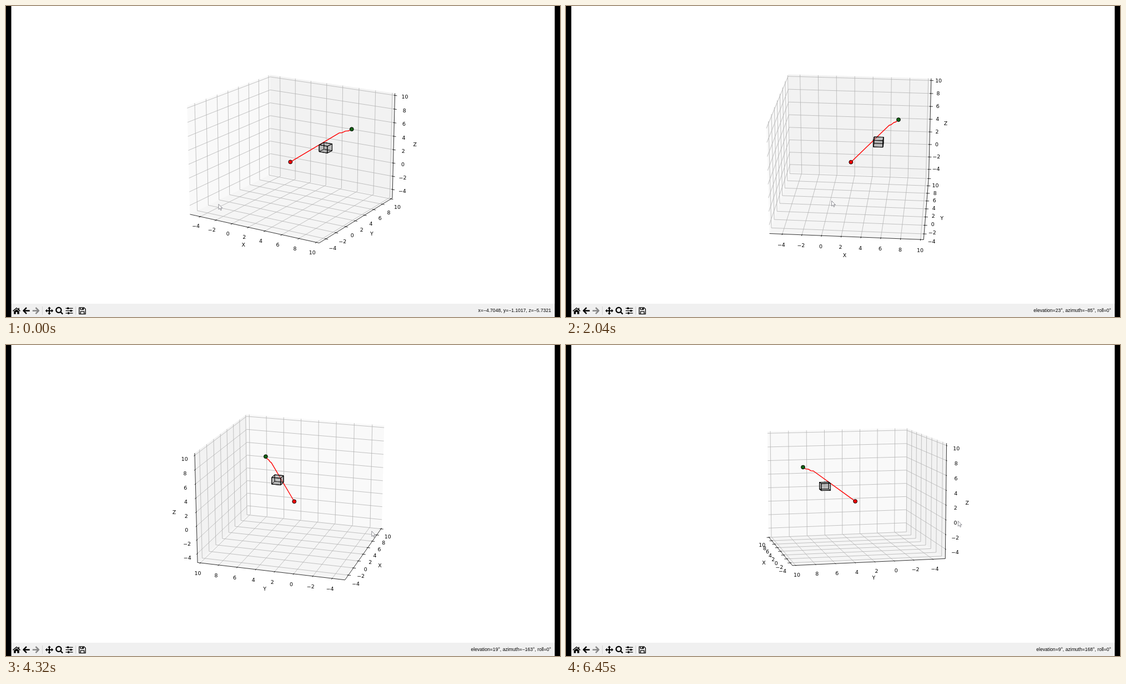
Write an HTML page with a canvas that moves like this. It is 998 px wide and 561 px high and loops after 6.54 s.

```html
<!DOCTYPE html>
<html lang="en">
<head>
<meta charset="utf-8">
<title>3D path plot</title>
<style>
html, body { margin: 0; width: 100%; height: 100%; overflow: hidden; background: #fff; }
canvas { display: block; }
</style>
</head>
<body>
<canvas id="stage" width="998" height="561"></canvas>
<script>
const ctx = document.getElementById('stage').getContext('2d');
const LOOP = 6540, DRAG_START = 1000;
const LO = -5.3125, HI = 10.3125, MID = 2.5;
const CENTER_X = 517, CENTER_Y = 266, SCALE = 2255;
const PLOT_FONT = '9.4px "DejaVu Sans", sans-serif';
const STATUS_FONT = '8.6px "Liberation Sans", Arial, sans-serif';

// time, azimuth, elevation, cursor x, cursor y
const KEYS = [
  [0, -58.4, 17.3, 383, 357.5],
  [600, -58.4, 17.3, 422.5, 350.5],
  [DRAG_START, -58.4, 17.3, 423.5, 350],
  [1410, -64, 18.7, 433.5, 347],
  [2040, -84.9, 22.6, 478.5, 351.5],
  [2910, -116, 23.5, 552, 352],
  [3720, -144.3, 22.6, 606.5, 349],
  [4830, -177, 13.7, 692.5, 323.5],
  [5460, -192.4, 8.6, 706.3, 317.5],
  [LOOP, -192.4, 8.6, 706.3, 317.5]
];
const PATH = [
  [2.3, 2.3, 1.28], [6.05, 6.05, 5.05], [6.27, 6.27, 5.05],
  [6.52, 6.52, 5.25], [6.75, 6.75, 5.25], [7, 7, 5.47]
];
const PANES = ['#f9f9f9', '#f2f2f2', '#f5f5f5'];

// Monotone cubic interpolation of one key column
function sample(t, col) {
  const rate = i => (KEYS[i + 1][col] - KEYS[i][col]) / (KEYS[i + 1][0] - KEYS[i][0]);
  const slope = i => {
    if (i === 0 || i === KEYS.length - 1) return 0;
    const a = rate(i - 1), b = rate(i);
    return a * b <= 0 ? 0 : 2 * a * b / (a + b);
  };
  let i = 0;
  while (i < KEYS.length - 2 && t >= KEYS[i + 1][0]) i++;
  const h = KEYS[i + 1][0] - KEYS[i][0], s = (t - KEYS[i][0]) / h, r = 1 - s;
  return KEYS[i][col] * (1 + 2 * s) * r * r + slope(i) * h * s * r * r +
    KEYS[i + 1][col] * s * s * (3 - 2 * s) - slope(i + 1) * h * s * s * r;
}

let ca, sa, ce, se;
function setView(az, el) {
  const rad = Math.PI / 180;
  ca = Math.cos(az * rad); sa = Math.sin(az * rad);
  ce = Math.cos(el * rad); se = Math.sin(el * rad);
}

function project(p) {
  const x = (p[0] - MID) * 8 / 105, y = (p[1] - MID) * 8 / 105, z = (p[2] - MID) * 2 / 35;
  const toward = ca * x + sa * y;
  const depth = 10 - ce * toward - se * z, k = SCALE / depth;
  return [CENTER_X + k * (ca * y - sa * x), CENTER_Y - k * (ce * z - se * toward), depth];
}

function trace(points) {
  ctx.beginPath();
  for (const p of points) ctx.lineTo(...project(p).slice(0, 2));
}

function line(points, color, width) {
  trace(points);
  ctx.strokeStyle = color;
  ctx.lineWidth = width;
  ctx.stroke();
}

// Copy of a point with some coordinates replaced
const put = (p, changes) => Object.assign([...p], changes);

const face = (axis, a, b) => {
  const j = (axis + 1) % 3, k = (axis + 2) % 3;
  return [a, put(a, { [j]: b[j] }), put(a, { [j]: b[j], [k]: b[k] }), put(a, { [k]: b[k] })];
};

const signed = (n, digits = 0) => n.toFixed(digits).replace('-', '\u2212');

function drawAxes() {
  const back = [ca > 0 ? LO : HI, sa > 0 ? LO : HI, LO];
  const front = back.map(v => LO + HI - v);
  const outward = (p, axis, d) => p.map((v, j) => j === axis ? v : v + Math.sign(v - MID) * d);
  const label = (text, p, drop) => {
    const [x, y] = project(p);
    ctx.fillText(text, x, y + drop);
  };

  for (let i = 0; i < 3; i++) {
    trace(face(i, back, front));
    ctx.fillStyle = PANES[i];
    ctx.fill();
  }
  const ticks = [-4, -2, 0, 2, 4, 6, 8, 10];
  for (let i = 0; i < 3; i++) {
    const j = (i + 1) % 3, k = (i + 2) % 3;
    for (const t of ticks) {
      const p = put(back, { [i]: t });
      line([put(p, { [j]: front[j] }), p, put(p, { [k]: front[k] })], '#b0b0b0', 0.76);
    }
  }
  ctx.font = PLOT_FONT;
  ctx.textAlign = 'center';
  ctx.fillStyle = '#000';
  for (let i = 0; i < 3; i++) {
    const side = i === 0 ? 1 : 0;
    const edge = put(back, { [side]: front[side] });
    const sign = back[side] === HI ? 1 : -1;
    line([edge, put(edge, { [i]: front[i] })], '#000', 0.8);
    for (const t of ticks) {
      const p = put(edge, { [i]: t });
      line([put(p, { [side]: p[side] + sign * 0.125 }), put(p, { [side]: p[side] - sign * 0.25 })], '#000', 0.8);
      label(signed(t), outward(p, i, 0.776), 7.1);
    }
    label('XYZ'[i], outward(put(edge, { [i]: MID }), i, 1.69), 2.7);
  }
}

function drawCube() {
  const lo = [4.5, 4.5, 2.5], hi = [5.5, 5.5, 3.5];
  const depth = f => f.reduce((sum, p) => sum + project(p)[2], 0);
  const faces = [0, 1, 2].flatMap(i => [face(i, lo, hi), face(i, hi, lo)]);
  faces.sort((a, b) => depth(b) - depth(a));
  for (const f of faces) {
    trace(f);
    ctx.closePath();
    ctx.fillStyle = 'rgba(128,128,128,.28)';
    ctx.fill();
    ctx.strokeStyle = '#000';
    ctx.lineWidth = 1;
    ctx.stroke();
  }
}

function drawDot(p, color) {
  const [x, y] = project(p);
  ctx.beginPath();
  ctx.arc(x, y, 3.4, 0, 7);
  ctx.fillStyle = color;
  ctx.fill();
  ctx.strokeStyle = '#000';
  ctx.lineWidth = 1;
  ctx.stroke();
}

function icon(x, strokes, fills, color = '#000', width = 2) {
  ctx.save();
  ctx.translate(x, 549.7);
  ctx.strokeStyle = ctx.fillStyle = color;
  ctx.lineWidth = width;
  ctx.stroke(new Path2D(strokes));
  ctx.fill(new Path2D(fills), 'evenodd');
  ctx.restore();
}

function drawToolbar(status) {
  ctx.fillStyle = '#f0f0f0';
  ctx.fillRect(9.5, 537, 979, 24);
  ctx.fillStyle = '#d4d4d4';
  ctx.fillRect(65, 542, 1, 15);
  ctx.fillRect(125, 542, 1, 15);

  const arrow = 'M.5-5.5L-5 0L.5 5.5M-5 0H6.2';
  icon(19, 'M-6.5 .7L0-5L6.5 .7', 'M0-2.8L4.8 1.4V6H1.3V2.4H-1.3V6H-4.8V1.4ZM3.2-5H4.9V-1H3.2Z', '#000', 1.5);
  icon(36.5, arrow, '', '#000', 2.4);
  ctx.save();
  ctx.translate(108, 0);
  ctx.scale(-1, 1);
  icon(54, arrow, '', '#868686', 2.4);
  ctx.restore();
  icon(78, 'M-5 0H5M0-5V5',
    'M0-7.3L3-4H-3ZM0 7.3L3 4H-3ZM-7.3 0L-4-3V3ZM7.3 0L4-3V3Z');
  icon(96, 'M3.5-1.2A4.6 4.6 0 1 1-5.7-1.2A4.6 4.6 0 1 1 3.5-1.2M2.2 2L6.2 6', '', '#000', 2.3);
  icon(114, 'M-6.5-4.4H6.5M-6.5 0H6.5M-6.5 4.4H6.5',
    'M-3.6-6.2H-1V-2.6H-3.6ZM1.8-1.8H4.4V1.8H1.8ZM-2.6 2.6H0V6.2H-2.6Z', '#000', 1.3);
  icon(137.5, 'M-5.7-5.5H3.2L5.7-3V5.9H-5.7ZM-3.2 5.5V1.4H3.2V5.5M-3.2-5V-2H2V-5',
    'M-.2-5H2V-2H-.2Z', '#000', 1.3);

  ctx.font = STATUS_FONT;
  ctx.textAlign = 'right';
  ctx.fillStyle = '#000';
  ctx.fillText(status, 982, 552.2);
}

function drawCursor(x, y) {
  ctx.save();
  ctx.translate(x, y);
  const shape = new Path2D('M0 0V9.4L2.2 7.5L3.8 11L5.3 10.3L3.8 7H6.8Z');
  ctx.fillStyle = '#fff';
  ctx.strokeStyle = '#707078';
  ctx.lineWidth = 0.8;
  ctx.fill(shape);
  ctx.stroke(shape);
  ctx.restore();
}

function statusText(t, az, el, cx, cy) {
  if (t >= DRAG_START) {
    const turn = az < -180 ? az + 360 : az;
    return `elevation=${signed(el)}°, azimuth=${signed(turn)}°, roll=0°`;
  }
  const right = (cx - KEYS[0][3]) * 0.0563, up = (KEYS[0][4] - cy) * 0.0563;
  const x = -4.7048 - sa * right - se * ca * up;
  const y = -1.1017 + ca * right - se * sa * up;
  const z = -5.7321 + ce * up * 4 / 3;
  return `x=${signed(x, 4)}, y=${signed(y, 4)}, z=${signed(z, 4)}`;
}

function draw(now) {
  const t = now % LOOP;
  const [az, el, cx, cy] = [1, 2, 3, 4].map(col => sample(t, col));
  setView(az, el);
  ctx.lineJoin = 'round';
  ctx.fillStyle = '#000';
  ctx.fillRect(0, 0, 998, 561);
  ctx.fillStyle = '#fff';
  ctx.fillRect(9.5, 0, 979, 537);
  drawAxes();
  line(PATH, '#f00', 1.4);
  drawCube();
  drawDot(PATH[0], '#f00');
  drawDot(PATH[PATH.length - 1], '#146414');
  drawToolbar(statusText(t, az, el, cx, cy));
  drawCursor(cx, cy);
}

const start = performance.now();
function tick() {
  draw(performance.now() - start);
  requestAnimationFrame(tick);
}
tick();
</script>
</body>
</html>
```
